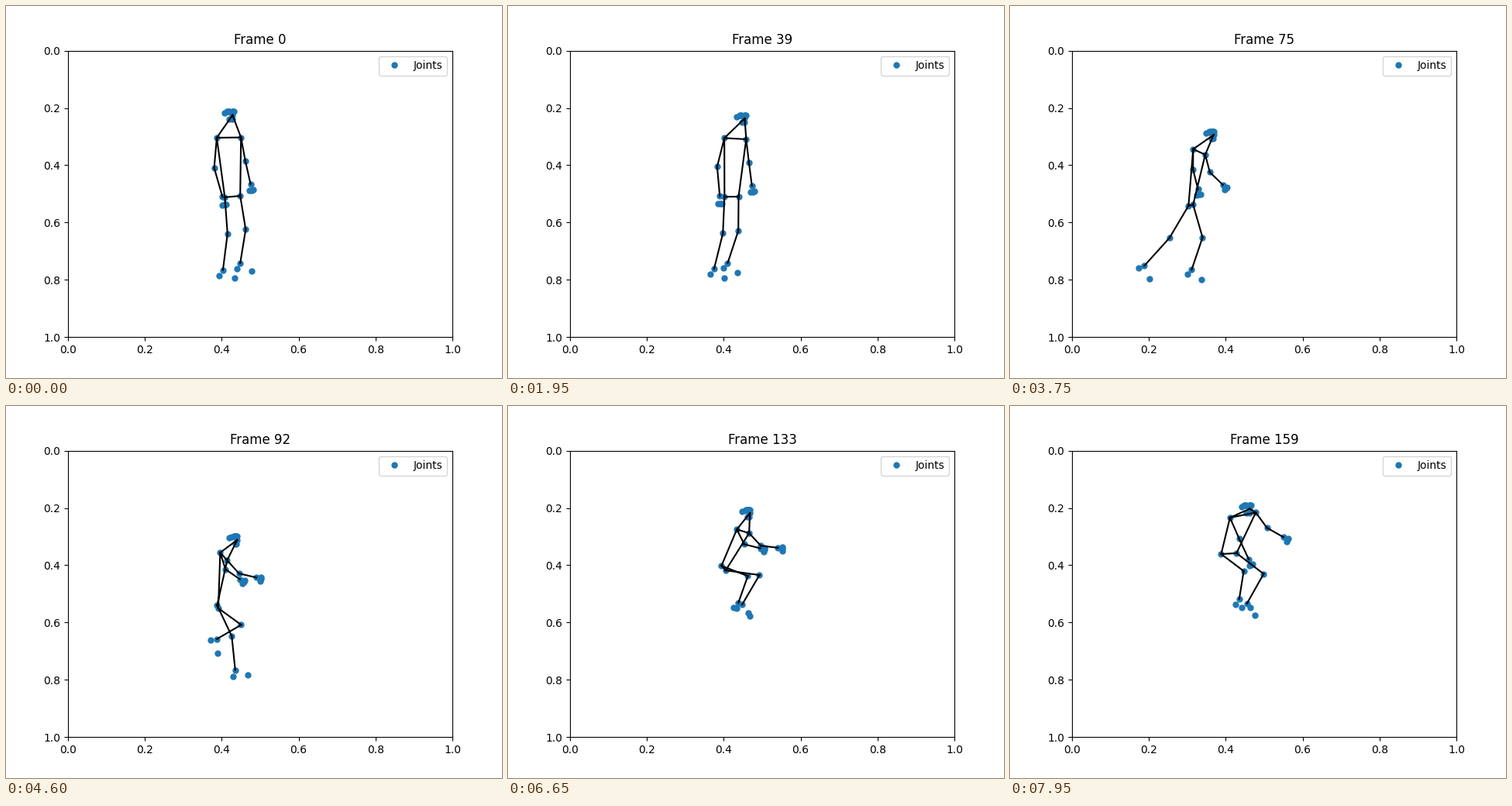
Write a matplotlib script that moves like this. It is 640 by 480 pixels and loops after 8000 ms.

```python
import numpy as np
import matplotlib.pyplot as plt
from matplotlib.animation import FuncAnimation

FRAMES, STEP_MS = 160, 50
UNIT = np.array([0.496, 0.3696])    # pixels per thousandth of each axis
LEG = {"r": 73, "l": 88}            # limb sizes in pixels
ARM_REST = 60
SIDES = "rl"


def pose(nose, shoulders, hips, wrists, ankles):
    """The points that steer the figure; each pair is right, left."""
    return np.array([nose, *shoulders, *hips, *wrists, *ankles], float)


def mix(a, b, w, shift=(0, 0), ankles=None):
    out = a + (b - a) * w + np.array(shift)
    if ankles is not None:
        out[-2:] = ankles
    return out


def build_keys():
    stand = pose((428, 225), [(387, 304), (450, 303)], [(408, 512), (448, 507)],
                 [(402, 511), (475, 466)], [(403, 766), (448, 742)])
    lean = pose((466, 272), [(400, 329), (450, 339)], [(378, 531), (411, 535)],
                [(359, 527), (454, 500)], [(327, 780), (352, 764)])
    stride = pose((440, 312), [(396, 356), (414, 383)], [(391, 550), (388, 540)],
                  [(447, 449), (490, 443)], [(387, 658), (435, 766)])
    leap = pose((458, 287), [(423, 325), (464, 307)], [(418, 458), (434, 462)],
                [(466, 430), (540, 321)], [(454, 590), (446, 650)])
    crouch = pose((468, 218), [(434, 275), (466, 288)], [(394, 402), (405, 418)],
                  [(495, 341), (541, 339)], [(438, 531), (448, 537)])
    settle = pose((462, 203), [(411, 234), (478, 216)], [(388, 361), (428, 358)],
                  [(460, 380), (550, 302)], [(435, 518), (455, 534)])

    sway = stand + [16, -21]
    back = mix(lean, stride, 0.6, (-85, 0), [(184, 748), (310, 765)])
    landing = mix(leap, crouch, 0.9)[-2:]
    keys = {
        0: stand,
        22: sway,
        34: mix(sway, lean, 0.42),
        48: mix(sway, lean, 0.58),
        57: lean,
        68: mix(lean, back, 0.76),
        78: back,
        85: mix(lean, stride, 0.85, (-37, 0), [(222, 725), (425, 765)]),
        92: stride,
        102: mix(leap, stride, 0.5, ankles=[(420, 605), (440, 650)]),
        115: leap,
        119: mix(leap, crouch, 0.55, ankles=landing),
        133: crouch,
        147: mix(crouch, settle, 0.5, (-10, 28)),
        159: settle,
    }
    return np.array(list(keys), float), np.stack(list(keys.values())) * UNIT


def key_slopes(t, y):
    """Slopes that keep the curve between its keys without overshoot."""
    h = np.diff(t)[:, None, None]
    d = np.diff(y, axis=0) / h
    m = np.zeros_like(y)
    m[0], m[-1] = d[0], d[-1]
    w1, w2 = 2 * h[1:] + h[:-1], h[1:] + 2 * h[:-1]
    same = d[:-1] * d[1:] > 0
    before = np.where(same, d[:-1], 1)
    after = np.where(same, d[1:], 1)
    m[1:-1] = np.where(same, (w1 + w2) / (w1 / before + w2 / after), 0)
    return m


T, Y = build_keys()
M = key_slopes(T, Y)


def steer(t):
    k = min(np.searchsorted(T, t, side="right") - 1, len(T) - 2)
    h = T[k + 1] - T[k]
    s = (t - T[k]) / h
    ease = s * s * (3 - 2 * s)
    return (Y[k] + (Y[k + 1] - Y[k]) * ease
            + h * s * (1 - s) * ((1 - s) * M[k] - s * M[k + 1]))


def axes_of(a, b):
    """Length from a to b, the unit vector along it and the one facing forward."""
    size = np.hypot(*(b - a))
    along = (b - a) / size
    return size, along, np.array([along[1], -along[0]])


def elbow_of(shoulder, wrist):
    size, _, fwd = axes_of(shoulder, wrist)
    return (shoulder + wrist) / 2 - 0.42 * abs(ARM_REST - size) * fwd


def knee_of(hip, ankle, length):
    size, _, fwd = axes_of(hip, ankle)
    length = max(length, 1.005 * size)
    return (hip + ankle) / 2 + np.sqrt(length ** 2 - size ** 2) / 2 * fwd


def hand(elbow, wrist):
    size, along, fwd = axes_of(elbow, wrist)
    return [wrist + 0.26 * size * along + side * fwd for side in (-3, 0, 2)]


def foot(knee, ankle):
    _, along, fwd = axes_of(knee, ankle)
    return [ankle + 7.5 * along - 3.5 * fwd, ankle + 8 * along + 16 * fwd]


def face(nose, shoulders):
    """Ears, eyes and mouth; they spread as the shoulders turn to the front."""
    turn = 0.2 * (shoulders[1][0] - shoulders[0][0])
    parts = [(-10, -2.5), (-10 + 1.3 * turn, -3.5)]
    for side in (-1, 1):
        parts += [(-2.5 + side * turn / 2 + dx, -4.5) for dx in (-1.2, 0, 1.2)]
        parts.append((-2 + side * turn / 3, 5))
    return [nose + np.array(p) for p in parts]


def figure_at(t):
    nose, *rest = steer(t)
    shoulders, hips, wrists, ankles = (rest[i:i + 2] for i in range(0, 8, 2))
    joints = [nose, *rest, *face(nose, shoulders)]
    bones = [(nose, shoulders[0]), (nose, shoulders[1]), shoulders, hips]
    for side, sh, hip, wrist, ankle in zip(SIDES, shoulders, hips, wrists, ankles):
        elbow = elbow_of(sh, wrist)
        knee = knee_of(hip, ankle, LEG[side])
        joints += [elbow, knee, *hand(elbow, wrist), *foot(knee, ankle)]
        bones += [(sh, elbow), (elbow, wrist), (sh, hip), (hip, knee), (knee, ankle)]
    to_axes = 1000 * UNIT
    return np.array(joints) / to_axes, np.array(bones) / to_axes


fig, ax = plt.subplots(figsize=(6.4, 4.8), dpi=100)
ax.set_xlim(0, 1)
ax.set_ylim(1, 0)
dots, = ax.plot([], [], "o", markersize=5, label="Joints")
lines, = ax.plot([], [], "k-", lw=1.5)
title = ax.set_title("Frame 0")
ax.legend(loc="upper right")


def draw(i):
    joints, bones = figure_at(i)
    dots.set_data(joints[:, 0], joints[:, 1])
    path = np.full((len(bones), 3, 2), np.nan)
    path[:, :2] = bones
    lines.set_data(path[..., 0].ravel(), path[..., 1].ravel())
    title.set_text(f"Frame {i}")
    return dots, lines, title


anim = FuncAnimation(fig, draw, frames=FRAMES, interval=STEP_MS,
                     repeat=True, repeat_delay=0)
plt.show()
```
